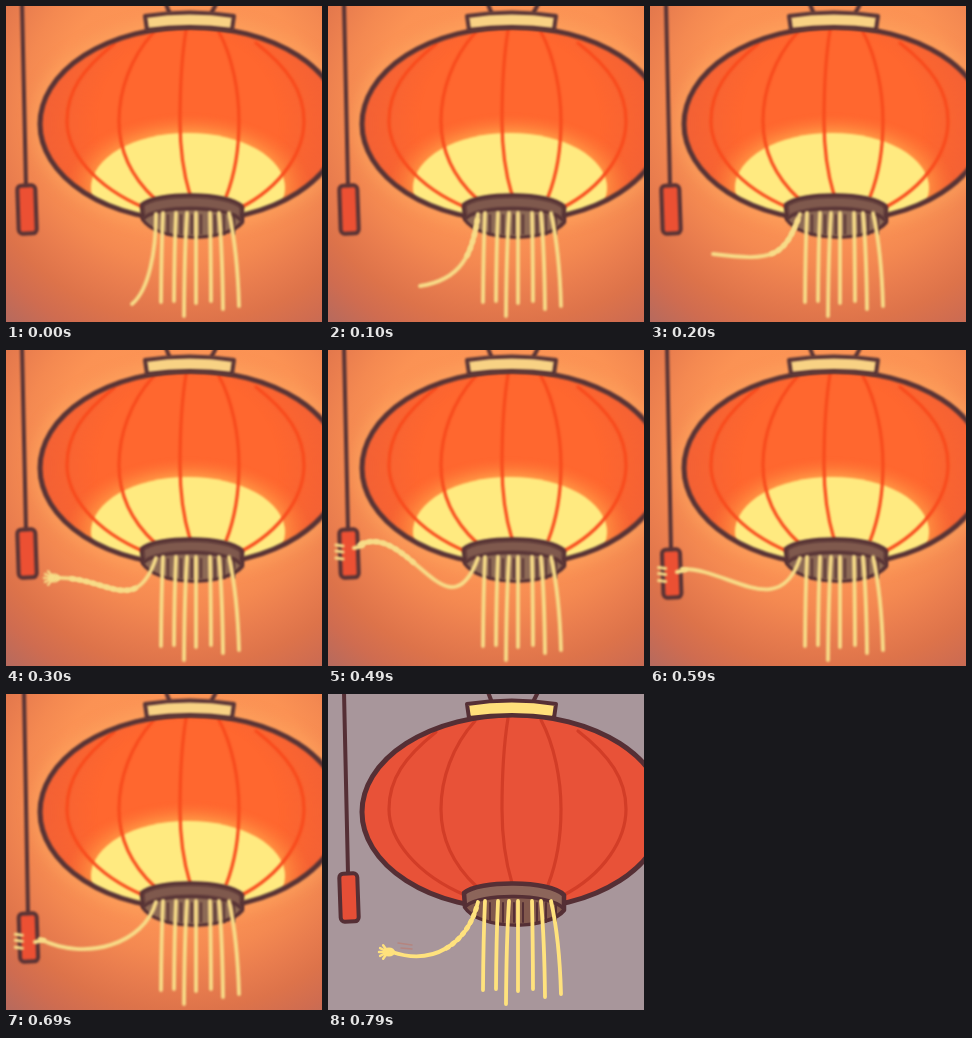
These frames come from a looping animation (316x316 px, 0.89 s). An HTML page with a canvas:

```html
<!DOCTYPE html>
<html lang="en">
<head>
<meta charset="utf-8">
<title>Lantern</title>
<style>
html, body { margin: 0; width: 100%; height: 100%; overflow: hidden; background: #a8969c; }
canvas { display: block; width: 100vw; height: 100vh; }
</style>
</head>
<body>
<canvas id="stage" width="316" height="316"></canvas>
<script>
const ctx = document.getElementById('stage').getContext('2d');
const LOOP = 890;

const LIT = {
  line: '#573335', body: '#ff672f', rib: '#f84b1d', cap: '#f8d284',
  band: '#7f594d', hole: '#8d6a56', thread: '#f7dc88', handle: '#ec5033', soft: 1.1
};
const OFF = {
  line: '#552f35', body: '#e85238', rib: '#d23d27', cap: '#ffdf7b',
  band: '#8c655a', hole: '#82594d', thread: '#ffe27d', handle: '#e64e36', soft: .7
};

// The arm is a cubic from the lantern; twist is its braided range along t.
const ROOT = [150, 208];
const POSES = [
  { at: 0, arm: [150, 245, 143, 284, 126, 298] },
  { at: 100, arm: [145, 250, 132, 274, 92, 280], twist: [.05, .4] },
  { at: 200, arm: [135, 250, 125, 256, 63, 248], twist: [.05, .55] },
  { at: 290, arm: [130, 268, 100, 226, 51, 228], twist: [.3, .9], hand: 'open' },
  { at: 390, arm: [125, 283, 85, 196, 43, 208], twist: [.45, 1], hand: 'open' },
  { at: 490, arm: [120, 290, 80, 170, 31, 195], twist: [.6, 1], hand: 'grip' },
  { at: 590, arm: [129, 272, 78, 218, 32, 219], hand: 'grip', pull: 20 },
  { at: 690, arm: [138, 250, 80, 268, 34, 245], hand: 'grip', pull: 40 },
  { at: 790, arm: [140, 250, 105, 272, 64, 258], twist: [.05, .5], hand: 'open', off: true }
];

function stroke(color, width, draw) {
  ctx.beginPath();
  draw();
  ctx.strokeStyle = color;
  ctx.lineWidth = width;
  ctx.stroke();
}

function line(color, width, x1, y1, x2, y2) {
  stroke(color, width, () => { ctx.moveTo(x1, y1); ctx.lineTo(x2, y2); });
}

function fill(color) {
  ctx.fillStyle = color;
  ctx.fill();
}

function radial(x, y, r, stops) {
  const g = ctx.createRadialGradient(x, y, 0, x, y, r);
  stops.forEach(([p, c]) => g.addColorStop(p, c));
  return g;
}

function bodyPath() {
  ctx.ellipse(185, 118, 151, 97, 0, 0, Math.PI * 2);
}

function background(off) {
  ctx.filter = 'none';
  ctx.fillStyle = off ? '#a8969b' : radial(178, 100, 290, [
    [0, '#ff9a58'], [.45, '#fb9254'], [.55, '#f48951'], [.65, '#e97d4e'],
    [.75, '#dd734a'], [.85, '#cf6c50'], [.95, '#b96a5c'], [1, '#ae6a62']
  ]);
  ctx.fillRect(0, 0, 316, 316);
  if (off) return;
  ctx.filter = 'blur(7px)';
  stroke('rgba(255,175,100,.4)', 18, bodyPath);
}

function glow() {
  ctx.save();
  ctx.translate(182, 182);
  ctx.scale(1, .6);
  ctx.fillStyle = radial(0, 0, 124, [
    [0, 'rgba(255,180,80,1)'], [.74, 'rgba(255,165,75,.8)'], [1, 'rgba(255,120,55,0)']
  ]);
  ctx.fillRect(-140, -140, 280, 280);
  ctx.restore();
  ctx.beginPath();
  ctx.ellipse(182, 182, 97, 55, 0, 0, Math.PI * 2);
  fill('#ffea80');
}

function ribs(color) {
  // top x, top y, widest x, bottom x, bottom y
  const list = [
    [108, 38, 61, 139, 202], [147, 27, 113, 148, 192], [180, 24, 174, 184, 189],
    [213, 26, 233, 220, 191], [250, 37, 298, 234, 202]
  ];
  for (const [tx, ty, wx, bx, by] of list) {
    stroke(color, 3.2, () => {
      ctx.moveTo(tx, ty);
      ctx.bezierCurveTo((tx + wx * 2) / 3, ty + 25, wx, 85, wx, 115);
      ctx.bezierCurveTo(wx, 145, (bx + wx * 2) / 3, by - 22, bx, by);
    });
  }
}

function cap(p) {
  line(p.line, 4, 160, -2, 163, 6);
  line(p.line, 4, 210, -2, 206, 6);
  ctx.beginPath();
  ctx.moveTo(139, 10);
  ctx.quadraticCurveTo(184, 3, 228, 10);
  ctx.lineTo(226, 24);
  ctx.quadraticCurveTo(184, 18, 141, 24);
  ctx.closePath();
  fill(p.cap);
  ctx.strokeStyle = p.line;
  ctx.lineWidth = 4;
  ctx.stroke();
}

function lantern(p, off) {
  ctx.beginPath();
  bodyPath();
  fill(p.body);
  ctx.save();
  ctx.beginPath();
  bodyPath();
  ctx.clip();
  if (!off) {
    ctx.fillStyle = radial(182, 118, 152, [
      [0, 'rgba(232,92,58,0)'], [.6, 'rgba(232,92,58,0)'], [1, 'rgba(232,92,58,.6)']
    ]);
    ctx.fillRect(0, 0, 316, 230);
    glow();
  }
  ribs(p.rib);
  ctx.restore();
  stroke(p.line, 5, bodyPath);
  cap(p);
}

function base(p) {
  ctx.beginPath();
  ctx.moveTo(136, 199);
  ctx.bezierCurveTo(150, 186, 222, 186, 236, 201);
  ctx.lineTo(236, 216);
  ctx.bezierCurveTo(220, 236, 152, 236, 137, 213);
  ctx.closePath();
  fill(p.band);
  ctx.strokeStyle = p.line;
  ctx.lineWidth = 4.5;
  ctx.stroke();
  ctx.beginPath();
  ctx.moveTo(138, 212);
  ctx.bezierCurveTo(152, 199, 220, 199, 235, 214);
  ctx.bezierCurveTo(220, 235, 152, 235, 138, 212);
  fill(p.hole);
  stroke(p.line, 3.5, () => {
    ctx.moveTo(138, 212);
    ctx.bezierCurveTo(152, 199, 220, 199, 235, 214);
  });
}

function threads(p) {
  // top x, tip x, tip y
  const list = [
    [157, 155, 296], [170, 168, 295], [181, 178, 310], [190, 190, 297],
    [204, 205, 295], [213, 217, 303], [223, 233, 300]
  ];
  for (const [x, tx, ty] of list) {
    line(p.line, 2, x + 5, 209, x + 5, 228);
    stroke(p.thread, 3.8, () => {
      ctx.moveTo(x, 207);
      ctx.quadraticCurveTo(x + (tx - x) * .85, 245, tx, ty);
    });
  }
}

function cord(p, pull) {
  const shift = pull / 20;
  line(p.line, 4, 16 + shift, -2, 20 + shift, 180 + pull);
  ctx.save();
  ctx.translate(21 + shift * .7, 203.5 + pull);
  ctx.rotate(-.035);
  ctx.beginPath();
  ctx.roundRect(-9, -24, 18, 48, 4);
  fill(p.handle);
  ctx.strokeStyle = p.line;
  ctx.lineWidth = 4;
  ctx.stroke();
  ctx.restore();
}

function along(arm, t) {
  const u = 1 - t;
  return [0, 1].map(i => u * u * u * ROOT[i] + 3 * u * u * t * arm[i] +
    3 * u * t * t * arm[i + 2] + t * t * t * arm[i + 4]);
}

function hand(p, pose) {
  const [x, y] = pose.arm.slice(4);
  if (pose.hand === 'grip') {
    const pull = pose.pull || 0;
    const fx = 10 + pull / 30, fy = 201 + pull * 1.13;
    for (const d of [-6, 0, 7]) line(p.thread, 3, fx - 2, fy + d, fx + 5, fy + d + 1);
    line(p.thread, 4, x - 5, y + 3, x + 4, y + 1);
    return;
  }
  ctx.beginPath();
  ctx.ellipse(x - 3, y, 6, 4.5, 0, 0, Math.PI * 2);
  fill(p.thread);
  for (let i = -2; i <= 2; i++) {
    const a = Math.PI + i * .5;
    line(p.thread, 2.5, x - 4, y, x - 4 + Math.cos(a) * 9, y + Math.sin(a) * 8);
  }
}

function arm(p, pose) {
  stroke(p.thread, 3.8, () => {
    ctx.moveTo(...ROOT);
    ctx.bezierCurveTo(...pose.arm);
  });
  if (pose.twist) {
    const [a, b] = pose.twist;
    ctx.setLineDash([2, 5]);
    stroke(p.thread, 5, () => {
      for (let i = 0; i <= 20; i++) ctx.lineTo(...along(pose.arm, a + (b - a) * i / 20));
    });
    ctx.setLineDash([]);
  }
  if (pose.hand) hand(p, pose);
}

function draw(pose) {
  const p = pose.off ? OFF : LIT;
  background(pose.off);
  ctx.filter = `blur(${p.soft}px)`;
  ctx.lineCap = ctx.lineJoin = 'round';
  cord(p, pose.pull || 0);
  lantern(p, pose.off);
  base(p);
  threads(p);
  if (pose.off) {
    line('#b5857f', 1.5, 70, 249, 84, 251);
    line('#b5857f', 1.5, 73, 254, 84, 255);
  }
  arm(p, pose);
}

const start = performance.now();
let shown;
function tick() {
  const t = (performance.now() - start) % LOOP;
  const pose = POSES.findLast(q => q.at <= t);
  if (pose !== shown) draw(shown = pose);
  requestAnimationFrame(tick);
}
tick();
</script>
</body>
</html>
```
